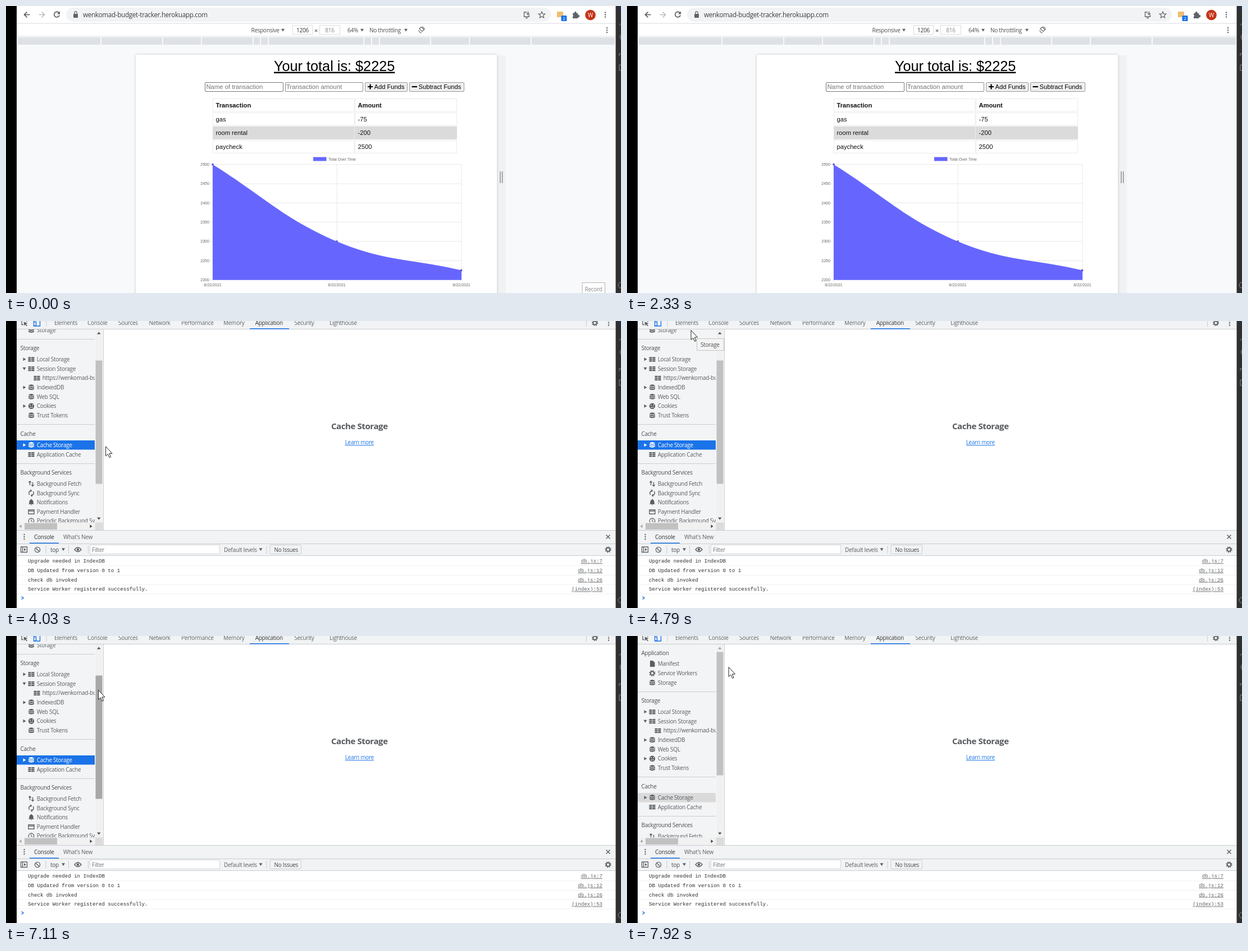
Write an HTML page that moves like this. It is 1095x512 px and loops after 7.99 s.

```html
<!DOCTYPE html>
<html lang="en">
<head>
<meta charset="utf-8">
<title>Budget tracker</title>
<style>
  html, body { margin: 0; width: 100%; height: 100%; overflow: hidden; background: #000; }
  svg { display: block; }
  text { font-family: "Open Sans", "Noto Sans", sans-serif; letter-spacing: -.027em; white-space: pre; }
  .page text { font-family: "Liberation Sans", Arial, sans-serif; letter-spacing: 0; }
  .mono text { font-family: "Liberation Mono", monospace; letter-spacing: 0; }
  .u { text-decoration: underline; }
  .link { text-decoration: underline 1px; text-underline-offset: 1px; }
  .end { text-anchor: end; }
  .mid { text-anchor: middle; }
  .bold { font-weight: 700; }
  #selected { color: #fff; }
  #selected.idle { color: #5a5e63; }
  #selected rect.row { fill: #1a73e8; }
  #selected.idle rect.row { fill: #dadada; }
</style>
</head>
<body>
<svg id="stage" width="1095" height="512" viewBox="0 0 1095 512"></svg>
<script>
const HOST = 'wenkomad-budget-tracker.herokuapp.com';
const GREY = '#5f6368', BLUE = '#1a73e8', BAR = '#f1f3f4', LINE = '#cacdd1';

// drawing helpers
const text = (x, y, s, size = 10, fill = '#4a4e53', cls = '') =>
  `<text x="${x}" y="${y}" font-size="${size}" fill="${fill}" class="${cls}">${s}</text>`;
const rect = (x, y, w, h, fill, more = '') =>
  `<rect x="${x}" y="${y}" width="${w}" height="${h}" fill="${fill}" ${more}/>`;
const box = (x, y, w, h, fill, stroke, r = 0) =>
  rect(x + .5, y + .5, w - 1, h - 1, fill, `stroke="${stroke}" rx="${r}"`);
const path = (d, stroke = GREY, w = 1.4, fill = 'none') =>
  `<path d="${d}" stroke="${stroke}" stroke-width="${w}" fill="${fill}"/>`;
const solid = (d, fill = 'currentColor', more = '') => `<path d="${d}" fill="${fill}" ${more}/>`;
const dot = (x, y, r, fill = GREY, more = '') => `<circle cx="${x}" cy="${y}" r="${r}" fill="${fill}" ${more}/>`;
const ring = (x, y, r, w = 1.3, stroke = GREY, more = '') =>
  dot(x, y, r, 'none', `stroke="${stroke}" stroke-width="${w}" ${more}`);
const group = (cls, body, more = '') => `<g class="${cls}" ${more}>${body}</g>`;
const dots = (x, y, gap = 4) => [-gap, 0, gap].map(d => dot(x, y + d, 1.2)).join('');
const down = (x, y, fill = GREY) => solid(`M${x - 3},${y - 2.3}h6l-3,5z`, fill);
const right = (x, y) => solid(`M${x - 2},${y - 3}v6l5,-3z`);
const gear = (x, y, r = 3.1) => ring(x, y, r, 1.8, 'currentColor') +
  ring(x, y, r + 1.6, 1.8, 'currentColor', `stroke-dasharray="${(r + 1.6) * Math.PI / 8}"`);

const icons = {
  db: (x, y) => solid(`M${x - 5},${y - 3.5}q5,-3.6 10,0q-5,3.6 -10,0z`) +
    [-2.3, .8].map(d => solid(`M${x - 5},${y + d}q5,3.2 10,0v2.1q-5,3.2 -10,0z`)).join(''),
  grid: (x, y) => [-4, -1, 2].map(d =>
    rect(x - 5.5, y + d, 5, 2.3, 'currentColor') + rect(x + .3, y + d, 5.2, 2.3, 'currentColor')).join(''),
  file: (x, y) => solid(`M${x - 4},${y - 5.5}h5l3.5,3.5v7.5h-8.5z`),
  gear: (x, y) => gear(x, y),
  cookie: (x, y) => dot(x, y, 5.2, 'currentColor') +
    [[-2, -1.5], [1.5, 2], [2.5, -2], [-1.5, 2.5]].map(p => dot(x + p[0], y + p[1], 1, BAR)).join(''),
  fetch: (x, y) => path(`M${x - 2.5},${y + 3}v-7m-2.3,2.4 2.3,-2.6 2.3,2.6M${x + 2.5},${y - 2.5}v7m-2.3,-2.4 2.3,2.6 2.3,-2.6`),
  sync: (x, y) => path(`M${x - 3},${y + 3}a4.2,4.2 0 0 1 3,-7.2m-1.6,-2 2,2 -2,2M${x + 3},${y - 3}a4.2,4.2 0 0 1 -3,7.2m1.6,2 -2,-2 2,-2`),
  bell: (x, y) => solid(`M${x - 5},${y + 3.2}l1.4,-1.6v-3q.4,-3 2.8,-3.4v-1h1.6v1q2.4,.4 2.8,3.4v3l1.4,1.6zM${x - 1.3},${y + 4}h2.6l-1.3,1.5z`),
  card: (x, y) => path(`M${x - 5},${y - 3.5}h10v7.5h-10zM${x - 5},${y - 1.2}h10`),
  clock: (x, y) => ring(x, y, 4.8) + path(`M${x},${y - 3}v3.2l2.2,1.4`, GREY, 1.1)
};

function sideStrip() {
  return rect(1085.5, 0, 9.5, 512, '#303030') + rect(1092, 0, 3, 9, '#23364d') +
    path('M1095,31l-3,4M1095,51l-2,4 2,5M1092,89v-4h3M1095,105h-3v10h3M1095,493a5,5 0 0 0 0,10', '#8a8a8a', 1);
}

function browserPage() {
  let s = rect(19, 0, 1067, 512, '#f8f9fa') + rect(19, 0, 1067, 54, '#fff') +
    rect(107, 3, 863, 25, BAR, 'rx="12.5"') + rect(19, 30.5, 1067, 1, '#d8dadd');
  // address bar
  s += path('M42.5,15.5h-10M37.5,10.5l-5,5 5,5', '#555', 1.6) +
    path('M58.5,15.5h10M63.5,10.5l5,5 -5,5', '#bbb', 1.5) +
    path('M94.5,12.5a4.8,4.8 0 1 0 .6,4', '#555', 1.6) + solid('M96,9.5v5h-5z', '#555') +
    rect(120, 14, 8, 7, GREY, 'rx="1"') + path('M121.8,14v-2a2.2,2.2 0 0 1 4.4,0v2', GREY, 1.2) +
    text(137, 20, HOST, 11.7, '#3c4043') +
    path('M927,11h-4.5v8h9v-3M925,21.5h4M929.5,9.5v6m-2.5,-2.5 2.5,2.5 2.5,-2.5', GREY, 1.3) +
    path('M954,10l1.6,3.9 4.2,.3 -3.2,2.7 1,4.1 -3.6,-2.2 -3.6,2.2 1,-4.1 -3.2,-2.7 4.2,-.3z', GREY, 1.2) +
    rect(981, 10, 11, 10, '#efbd72') + rect(988.5, 17, 10, 10, BLUE, 'rx="1.5"') +
    text(993.5, 25, '2', 8, '#fff', 'mid') +
    solid('M1009,13h3a2,2 0 1 1 3.5,0h3v3.2a2,2 0 1 1 0,3.6v2.2h-9.5v-3a2,2 0 0 0 0,-3.5z', GREY) +
    dot(1040.5, 16, 9.3, '#c5341a') + text(1040.5, 19.5, 'W', 10, '#fff', 'mid') + dots(1067, 15.5);
  // device toolbar and ruler
  s += text(436.5, 46.5, 'Responsive') + down(493, 43) +
    box(510, 34, 36, 17, '#fff', '#dcdcdc') + text(528, 46.5, '1206', 10, '#333', 'mid') +
    text(552, 47.5, '×', 11, '#333', 'mid') +
    box(558, 34, 37, 17, '#fff', '#dcdcdc') + text(576.5, 46.5, '816', 10, '#888', 'mid') +
    text(608, 46.5, '64%') + down(634, 43) + text(647, 46.5, 'No throttling') + down(712, 43) +
    path('M736,40.5l3.2,-3.2 5,5 -3.2,3.2zM735,43a5.5,5.5 0 0 0 5,5M745,42.5a5.5,5.5 0 0 0 -4,-5.2', GREY, 1.1) +
    dots(1070, 43) + rect(19, 53.5, 1067, 1, '#e1e3e6') + rect(21, 56, 1063, 13, '#dee1e6') +
    [169, 279, 348, 440, 453, 467, 637, 651, 665, 756, 825, 935].map(x => rect(x - .8, 56, 1.6, 13, '#fff')).join('') +
    rect(874, 88, 16, 424, '#f0f2f3') +
    rect(231, 87, 643, 430, '#fff', 'style="filter:drop-shadow(0 0 2px #0003)"') +
    rect(879.3, 295, 1.4, 21, '#888') + rect(883, 295, 1.4, 21, '#888');
  return s + group('page', budget());
}

function budget() {
  const ink = '#111', hint = '#757575';
  let s = text(477, 115.5, 'Your total is: $2225', 25.25, '#000', 'u') +
    box(354, 136, 140, 17, '#fff', '#767676', 1.5) + text(356.5, 148, 'Name of transaction', 11.25, hint) +
    box(497, 136, 139, 17, '#fff', '#8a8a8a', 1.5) + text(499, 148, 'Transaction amount', 11.25, hint) +
    box(639, 136, 76, 17, '#efefef', '#999', 1.5) + path('M644,144h9M648.5,139.5v9', '#000', 2.2) +
    text(655.5, 148, 'Add Funds', 11.2, '#000') +
    box(718, 136, 98, 17, '#efefef', '#999', 1.5) + path('M722.5,144h9.5', '#000', 2.2) +
    text(734.5, 148, 'Subtract Funds', 11.2, '#000');
  [['Transaction', 'Amount'], ['gas', '-75'], ['room rental', '-200'], ['paycheck', '2500']].forEach(([name, amount], i) => {
    const y = 165 + i * 24.8, cls = i ? '' : 'bold';
    const [fill, edge] = i === 2 ? ['#dbdbdb', '#dbdbdb'] : ['#fff', '#ebebeb'];
    s += box(368, y, 252.5, 23.5, fill, edge) + box(621, y, 182, 23.5, fill, edge) +
      text(373.5, y + 15.8, name, 11.2, ink, cls) + text(626.5, y + 15.8, amount, 11.2, ink, cls);
  });
  s += rect(547, 269.5, 23.5, 7, '#6666ff') + text(574, 275.5, 'Total Over Time', 7, '#666');
  for (let i = 0; i < 7; i++) {
    const y = 282.7 + i * 34.33;
    s += rect(363, y - .4, 448, .8, '#e3e3e3') + text(362, y + 2.4, 2500 - i * 50, 7.1, '#666', 'end');
  }
  [368, 589, 811].forEach(x => {
    s += rect(x - .4, 282.5, .8, 211, '#e3e3e3') + text(x, 500.3, '8/22/2021', 7.1, '#666', 'mid');
  });
  s += solid('M368,282.7C456.4,337.8 494.6,379.8 589,420C671.8,455.3 722.2,451 811,471.5V488.7H368z', '#6666ff');
  return s + [[368, 282.7], [589, 420], [810.5, 471.5]].map(p => dot(...p, 1.9, '#5c5ce6')).join('');
}

function tree() {
  const row = (y, icon, label, arrow, x = 45) =>
    (arrow ? arrow(32.5, y) : '') + icons[icon](x, y) + text(x + 9.7, y + 3.6, label, 10, 'currentColor');
  const head = (y, label) => text(25.5, y + 3.6, label);
  const open = (x, y) => down(x, y, 'currentColor');
  const rule = y => rect(19, y, 140, 1, LINE);
  return head(30, 'Application') + row(49.5, 'file', 'Manifest') + row(66.5, 'gear', 'Service Workers') +
    row(83.3, 'db', 'Storage') + rule(99) +
    head(115.5, 'Storage') + row(135.3, 'grid', 'Local Storage', right) + row(152, 'grid', 'Session Storage', open) +
    row(168.8, 'grid', 'https://' + HOST, null, 55) + row(185.5, 'db', 'IndexedDB', right) + row(202.2, 'db', 'Web SQL') +
    row(218.8, 'cookie', 'Cookies', right) + row(235.5, 'db', 'Trust Tokens') + rule(251) +
    head(268.3, 'Cache') +
    group('', rect(19, 280, 139, 16.5, '', 'class="row"') + row(288.2, 'db', 'Cache Storage', right), 'id="selected"') +
    row(305, 'grid', 'Application Cache') + rule(321) +
    head(337.3, 'Background Services') + row(357, 'fetch', 'Background Fetch') + row(374, 'sync', 'Background Sync') +
    row(390.5, 'bell', 'Notifications') + row(407.2, 'card', 'Payment Handler') + row(423.8, 'clock', 'Periodic Background Sync');
}

function devtools() {
  const tabs = { Elements: 86, Console: 145, Sources: 200, Network: 254.5, Performance: 312, Memory: 387, Application: 443.7, Security: 513.5, Lighthouse: 576 };
  let s = rect(19, 0, 1067, 512, '#fff') + rect(19, 0, 1067, 14, BAR) + rect(19, 14, 1067, 1, LINE) +
    path('M37,1.5v-3h-9v8h3', GREY, 1.3) + solid('M31.5,1.5l7,2.5 -3,1.2 2.5,3 -1.3,1.1 -2.5,-3 -1.7,2.5z') +
    path('M49.5,9v-12h11v12zM49.5,8.5h4v-7h-4', BLUE, 1.4) + rect(71.5, 0, 1, 10, LINE);
  for (const name in tabs) s += text(tabs[name], 7, name, 10, name === 'Application' ? '#333' : GREY);
  s += rect(434, 13, 70, 1.5, BLUE) + rect(1033, 0, 1, 10, LINE) + gear(1048.5, 3.5) + dots(1073, 3.5);
  // sidebar
  s += rect(19, 15, 139, 359, '#f3f4f5') + group('', group('', tree(), 'id="tree"'), 'clip-path="url(#pane)"') +
    rect(158.5, 15, 14, 345, '#f1f1f1') + rect(159.5, 70.5, 12, 220, '#c1c1c1', 'id="thumb"') +
    solid('M162,23.5h6.5l-3.2,-4z', '#505050', 'id="up"') + solid('M162,350.5h6.5l-3.2,4z', '#505050') +
    rect(19, 359.5, 139.5, 13.5, '#f1f1f1') + rect(33, 360.5, 58, 11.5, '#c1c1c1') +
    solid('M27.5,363.3v6l-4,-3z', '#a3a3a3') + solid('M149.5,363.3v6l4,-3z', '#404040') +
    rect(158.5, 359.5, 14, 13.5, '#dcdcdc') + rect(173, 15, 1, 359, LINE) +
    text(629.3, 193, 'Cache Storage', 15, '#55585c', 'bold mid') + text(629.3, 220.3, 'Learn more', 10, BLUE, 'link mid');
  // console drawer
  s += rect(19, 373, 1067, 46, BAR) + [373, 397, 418].map(y => rect(19, y, 1067, 1, LINE)).join('') +
    dots(32.5, 385) + text(50, 388.6, 'Console', 10, '#333') + rect(42, 395.5, 52, 1.5, BLUE) + text(102, 388.6, "What's New", 10, GREY) +
    path('M1068.5,381.5l7,7m0,-7l-7,7', GREY, 1.5) +
    path('M26.5,403h11v9.5h-11zM29.5,403v9.5', GREY, 1.3) + solid('M32,405.3v5l4,-2.5z', GREY) +
    ring(56, 408, 4.6, 1.4) + path('M53,405l6,6', GREY, 1.4) +
    [70.5, 111, 146, 463.5].map(x => rect(x, 401, 1, 14, LINE)).join('') +
    text(79, 411.5, 'top') + down(102, 407.5) +
    path('M122,407.8q6,-7.5 12,0q-6,7.5 -12,0z', GREY, 1.4) + dot(128, 407.8, 2.2) +
    box(149, 399, 232, 17, '#fff', '#d5d7da') + text(153, 411.5, 'Filter', 10, '#757575') +
    text(388, 411.5, 'Default levels', 10, GREY) + down(453.5, 407.5) +
    box(469.5, 399, 56.5, 17, BAR, LINE, 1) + text(477.5, 411.5, 'No Issues', 10, '#444') + gear(1072, 407.8);
  const log = [['Upgrade needed in IndexDB', 'db.js:7'], ['DB Updated from version 0 to 1', 'db.js:12'],
    ['check db invoked', 'db.js:26'], ['Service Worker registered successfully.', '(index):53']];
  s += group('mono', log.map(([msg, src], i) => {
    const y = 431.3 + i * 16.7;
    return text(39, y, msg, 9.15, '#303030') + text(1062, y, src, 9.15, GREY, 'link end') + rect(19, y + 5, 1067, 1, '#f0f0f0');
  }).join('')) + path('M27.5,491.5l3.5,2.5 -3.5,2.5', BLUE, 1.5);
  return s + group('', box(478, 399, 255, 15, '#fff', '#777') + text(728, 409.5, 'Inspect - ' + HOST + '/', 9.9, '#555', 'end'), 'id="label" opacity=".35"');
}

const el = id => document.getElementById(id);
el('stage').innerHTML = '<clipPath id="pane"><rect x="19" y="15" width="139.5" height="344.5"/></clipPath>' +
  rect(0, 0, 1095, 512, '#000') +
  group('', browserPage() + group('', box(1025.5, 493, 41.5, 30, '#fdfdfd', '#b5b5b5') + text(1030.5, 509, 'Record', 10, '#8a8a8a'), 'id="record"'), 'id="browser"') +
  group('', devtools(), 'id="tools" color="#5a5e63"') + sideStrip() +
  group('', box(124, 31, 49, 22, '#f4f4f4', '#c4c4c4') + text(131, 45.6, 'Storage'), 'id="tip"') +
  group('', path('M.5,.5V17.5L4.3,14 7,20.3 9.5,19.2 6.9,13H12z', '#222', 1, '#fff'), 'id="pointer"');

const LOOP = 7990;
// pointer moves: start, end, steps, then way points
const moves = [
  [70, 460, 7, [1010, 485], [860, 395], [700, 320], [588, 284]],
  [600, 740, 3, [560, 272], [505, 250], [473, 240]],
  [1270, 1530, 5, [480, 250], [505, 300], [560, 400], [604, 482]],
  [2190, 2260, 2, [688, 495], [513, 410]],
  [3350, 4100, 12, [473, 428], [340, 270], [170, 60], [100, 0], [63, 30], [130, 170], [226, 269]],
  [4170, 4720, 9, [222, 255], [170, 130], [120, 50], [105, 24], [113.5, 16]],
  [5190, 5880, 11, [100, 14], [87, 8], [180, 4], [330, 6], [460.5, 13]],
  [5950, 6440, 8, [471, 20], [440, 12], [330, 22], [230, 46], [187, 56]],
  [6640, 6770, 3, [184, 64], [179, 75], [176, 83]],
  [6910, 7110, 4, [172, 88], [166, 94], [164, 96]],
  [7240, 7650, 7, [164, 90], [164, 60], [166, 25], [165, 5]],
  [7720, 7920, 4, [169, 14], [176, 38], [180.5, 55]]
];
const hidden = [[0, 70], [1600, 2190], [2330, 3350], [4990, 5190]];

function along(points, u) {
  const f = u * (points.length - 1), i = Math.min(Math.floor(f), points.length - 2), v = f - i;
  const [a, b, c, d] = [-1, 0, 1, 2].map(k => points[Math.max(0, Math.min(points.length - 1, i + k))]);
  return [0, 1].map(k => b[k] + .5 * v * (c[k] - a[k] +
    v * (2 * a[k] - 5 * b[k] + 4 * c[k] - d[k] + v * (3 * (b[k] - c[k]) + d[k] - a[k]))));
}

function pointerAt(t) {
  const move = moves.findLast(m => t >= m[0]) || moves[0];
  const [start, end, steps, ...points] = move;
  const u = Math.max(0, Math.min(1, (t - start) / (end - start)));
  return along(points, Math.min(1, Math.floor(u * (steps - 1) + .06) / (steps - 1)));
}

const show = (id, on) => el(id).setAttribute('visibility', on ? 'visible' : 'hidden');

function draw(t) {
  const [x, y] = pointerAt(t), inTools = t >= 2930, pressed = t >= 7240, released = t >= 7720;
  el('browser').style.display = inTools ? 'none' : '';
  el('tools').style.display = inTools ? '' : 'none';
  show('record', t < 70);
  show('label', t < 3000);
  show('tip', t >= 4790 && t < 5190);
  show('pointer', !hidden.some(([a, b]) => t >= a && t < b));
  el('pointer').setAttribute('transform', `translate(${x} ${y})`);
  // the dragged thumb follows the pointer up to the end of its track
  const drag = released ? 42 : pressed ? Math.max(0, Math.min(42, 96 - y)) : 0;
  el('thumb').setAttribute('y', 70.5 - drag);
  el('thumb').setAttribute('fill', released || t < 6910 ? '#c1c1c1' : pressed ? '#787878' : '#a8a8a8');
  el('tree').setAttribute('transform', `translate(0 ${67 * (drag / 42 - 1)})`);
  el('up').setAttribute('fill', drag < 42 ? '#505050' : '#a3a3a3');
  el('selected').setAttribute('class', pressed ? 'idle' : '');
}

const begin = performance.now();
(function tick() {
  draw((performance.now() - begin) % LOOP);
  requestAnimationFrame(tick);
})();
</script>
</body>
</html>
```
